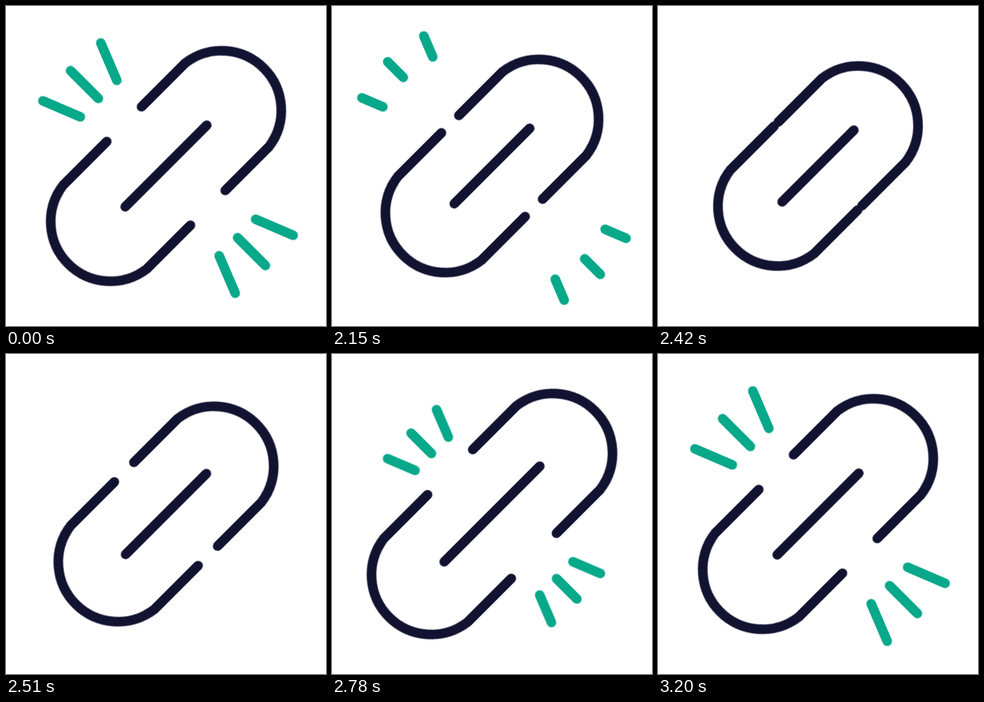
Write an HTML page without scripts that moves like this. It is 400 px wide and 400 px high and loops after 3230 ms.

```html
<!DOCTYPE html>
<html lang="en">
<head>
<meta charset="utf-8">
<title>Broken link icon</title>
<style>
  html, body { margin: 0; height: 100%; overflow: hidden; background: #fff; }
  svg { display: block; width: 100vw; height: 100vh; }

  path {
    fill: none;
    stroke: #121331;
    stroke-width: 12;
    stroke-linecap: round;
    vector-effect: non-scaling-stroke;
  }
  path, .rays {
    animation: 3230ms cubic-bezier(.333, 0, .667, 1) infinite;
  }
  .half { animation-name: slide; }
  .bar { animation-name: stretch; }
  .rays { animation-name: approach, blink; }
  .rays path {
    --away: 41px;
    stroke: #08a88a;
    animation-name: shoot;
  }
  .rays .middle { --away: 52.5px; }

  /* The halves close, spring apart, then settle. */
  @keyframes slide {
    0%, 61.92%, 99.07%, 100% { transform: translateX(0); }
    71.21%, 73.07% { transform: translateX(-30.4px); }
    83.4%, 88.2% { transform: translateX(9.2px); }
  }

  @keyframes stretch {
    0%, 61.92%, 99.07%, 100% { transform: scaleX(1); }
    71.21%, 73.07% { transform: scaleX(.85); }
    83.28%, 87.93% { transform: scaleX(1.172); }
  }

  /* Each ray shrinks while flying outward, then grows back from the gap. */
  @keyframes shoot {
    0%, 61.92%, 99.07%, 100% { transform: translateX(0) scaleX(1); }
    71.21%, 72.13% { transform: translateX(var(--away)) scaleX(.13); }
    72.14%, 78.64% {
      transform: translateX(0) scaleX(.02);
      animation-timing-function: cubic-bezier(.25, 1, .5, 1);
    }
  }

  @keyframes approach {
    0%, 72.13%, 99.07%, 100% { transform: scale(1); }
    72.14%, 78.64% {
      transform: scale(.5);
      animation-timing-function: cubic-bezier(.33, 1, .68, 1);
    }
  }

  @keyframes blink {
    0%, 72.13% { visibility: visible; }
    72.14%, 79.56% { visibility: hidden; }
    79.57%, 100% { visibility: visible; }
  }
</style>
</head>
<body>
<svg viewBox="0 0 400 400">
  <g transform="translate(200 200) rotate(-45)">
    <path class="half" d="M30.7 -73.9H108.5A74.6 74.6 0 0 1 108.5 73.9H30.7"/>
    <g transform="rotate(180)">
      <path class="half" d="M30.7 -73.9H108.5A74.6 74.6 0 0 1 108.5 73.9H30.7"/>
    </g>
    <path class="bar" d="M-72.1 0H72.1"/>
  </g>

  <g transform="translate(202.5 202.6)">
    <g class="rays">
      <g transform="translate(-74 -133) rotate(246.8)"><path d="M-25.5 0H25.5"/></g>
      <g transform="translate(-104.4 -104.4) rotate(225)"><path class="middle" d="M-24.6 0H24.6"/></g>
      <g transform="translate(-133 -74) rotate(203.2)"><path d="M-25.5 0H25.5"/></g>
    </g>
    <g transform="rotate(180)">
      <g class="rays">
        <g transform="translate(-74 -133) rotate(246.8)"><path d="M-25.5 0H25.5"/></g>
        <g transform="translate(-104.4 -104.4) rotate(225)"><path class="middle" d="M-24.6 0H24.6"/></g>
        <g transform="translate(-133 -74) rotate(203.2)"><path d="M-25.5 0H25.5"/></g>
      </g>
    </g>
  </g>
</svg>
</body>
</html>
```
